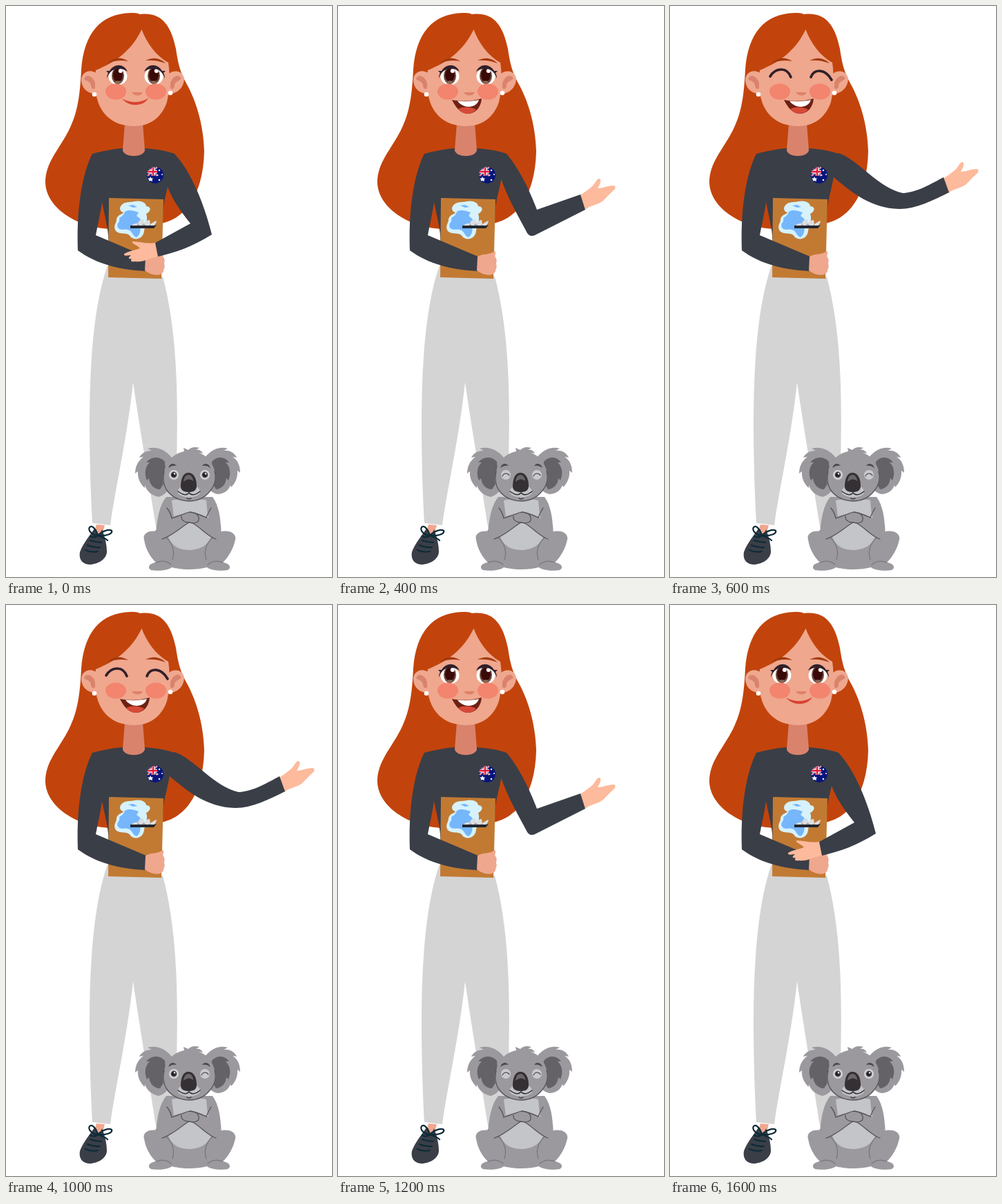
These frames come from a looping animation (472 px wide and 827 px high, 1800 ms). An HTML page:

```html
<!DOCTYPE html>
<html lang="en">
<head>
<meta charset="utf-8">
<title>Presenter and koala</title>
<style>
html, body { margin: 0; width: 100%; height: 100%; overflow: hidden; background: #fff; }
svg { display: block; width: 472px; height: 827px; }

.rest, .out, .side, .wide, .peak, .talk, .look, .beam, .awake, .doze, .wink {
  animation: 1800ms step-end infinite;
}
.rest  { animation-name: rest; }
.out   { animation-name: out; }
.side, .doze { animation-name: side; }
.wide  { animation-name: wide; }
.peak  { animation-name: peak; }
.talk  { animation-name: talk; }
.look  { animation-name: look; }
.beam, .wink { animation-name: beam; }
.awake { animation-name: awake; }

/* nine equal beats, mirrored around the fifth */
@keyframes rest  { 0%, 88.888% { opacity: 1 } 11.111% { opacity: 0 } 100% { opacity: 1 } }
@keyframes talk  { 0%, 88.888%, 100% { opacity: 0 } 11.111% { opacity: 1 } }
@keyframes out   { 0%, 22.222%, 88.888%, 100% { opacity: 0 } 11.111%, 77.777% { opacity: 1 } }
@keyframes side  { 0%, 33.333%, 77.777%, 100% { opacity: 0 } 22.222%, 66.666% { opacity: 1 } }
@keyframes wide  { 0%, 44.444%, 66.666%, 100% { opacity: 0 } 33.333%, 55.555% { opacity: 1 } }
@keyframes peak  { 0%, 55.555%, 100% { opacity: 0 } 44.444% { opacity: 1 } }
@keyframes look  { 0%, 66.666%, 100% { opacity: 1 } 33.333% { opacity: 0 } }
@keyframes beam  { 0%, 66.666%, 100% { opacity: 0 } 33.333% { opacity: 1 } }
@keyframes awake { 0%, 77.777%, 100% { opacity: 1 } 22.222% { opacity: 0 } }

.skin { fill: #efa78e; }
.shade { fill: #d9836d; }
.palm { fill: #fdba9c; }
.hair { fill: #c2440c; }
.knit { fill: #3a3e47; }
.fur { fill: #9b999e; }
.dark { fill: #646266; }
.pale { fill: #c3c5c9; }
.line { fill: none; stroke: #56545a; stroke-width: 1.3; stroke-linecap: round; stroke-linejoin: round; }
.lash { fill: none; stroke: #30202a; stroke-width: 3.6; stroke-linecap: round; }
</style>
</head>
<body>
<svg viewBox="0 0 472 827">
<defs>
  <path id="hand" class="palm" d="M351 274 C359 268 367 263 370 259 C373 255 375 250 379 250 C382 252 379 259 376 264 C383 264 391 260 399 260 C403 261 402 265 398 268 C393 272 389 277 384 282 C375 289 366 288 358 295Z"/>
  <path id="lid" fill="#30202a" d="M146 105 C146 101 147 99 148 97 L145 94 L150 94 C157 83 170 83 176 95 C166 88 151 89 146 105Z"/>
  <path id="armLine" class="line" d="M219 752 C229 748 238 740 250 737 C262 733 276 735 279 742 C280 748 272 750 264 748 C252 756 238 769 225 772"/>
  <g id="kEye">
    <circle r="7" fill="#d3d4d7"/>
    <circle r="4.400" fill="#454147"/>
    <circle cx="-.3" r="2.600" fill="#201d20"/>
    <circle cx="1" cy="-1.500" r="1.200" fill="#fff"/>
  </g>
  <g id="kShut">
    <circle r="7" fill="#c9cace"/>
    <path class="line" d="M-5 2 C-3 -3 3 -3 5 1"/>
  </g>
  <g id="eye">
    <ellipse rx="13.500" ry="12.500" fill="#fff"/>
    <ellipse cy="-1" rx="9" ry="12" fill="#6c4a3d"/>
    <ellipse cy="-2" rx="7" ry="10" fill="#3a0908"/>
    <ellipse cy="8" rx="4" ry="1.800" fill="#8d6a58"/>
    <circle cx="3.800" cy="-8" r="3" fill="#fff"/>
  </g>
  <clipPath id="disc"><circle cx="216" cy="245" r="12"/></clipPath>
</defs>

<!-- hair behind -->
<path class="hair" d="M181 10 C136 11 113 40 109 92 C107 130 104 154 91 180 C76 209 57 227 57 256 C58 291 101 321 152 323 L225 315 C267 306 286 262 287 210 C286 170 274 134 260 110 C253 97 249 84 246 62 C239 29 226 8 194 12 C190 10 186 10 181 10Z"/>

<!-- legs -->
<path fill="#d4d4d4" d="M147 376 C127 432 121 520 121 602 C121 662 123 712 125 749 L151 752 C158 700 176 622 184 545 C192 601 207 690 218 760 L242 756 C248 714 247 674 247.500 632 C249 540 245 460 227 392Z"/>
<path class="skin" d="M131 751 L143 752 L139 767 L127 764Z"/>
<path class="knit" d="M128 757 C122 766 111 779 107 791 C105 802 111 809 122 809 C134 808 146 801 146 790 C146 780 143 768 139 758 L135 768Z"/>
<g fill="none" stroke="#0b2b38" stroke-width="2.200" stroke-linecap="round">
  <path d="M133 767 C131 758 124 751 121 755 C118 760 126 767 133 767 C138 761 149 757 153 760 C155 765 143 768 133 767 C138 769 143 770 147 774 M133 767 C129 770 125 770 122 768"/>
  <path d="M122 774 Q130 777 138 777 M118 781 Q127 785 136 784 M115 788 Q124 792 133 790"/>
</g>

<!-- torso -->
<path class="knit" d="M170 206 C155 207 139 210 125 214 L139 284 C142 300 147 318 148 332 L150 380 L222 380 L228 291 C229 281 232 272 234 262 L244 214 C230 209 214 207 200 206Z"/>
<path class="shade" d="M172 170 L169 209 C171 220 199 220 201 209 L198 170Z"/>

<!-- badge -->
<g clip-path="url(#disc)">
  <path fill="#07157a" d="M203 232H229V258H203Z"/>
  <path stroke="#fff" stroke-width="2.200" d="M205 233 L219 246 M219 233 L205 246"/>
  <path stroke="#e2183a" stroke-width="1" d="M205 233 L219 246 M219 233 L205 246"/>
  <path stroke="#fff" stroke-width="4.400" d="M203 240H219 M213 232V246"/>
  <path stroke="#e2183a" stroke-width="2.400" d="M203 240H219 M213 232V246"/>
  <path fill="#fff" d="M209 247 L210.300 249.500 L213 249.500 L211.500 251.500 L212 254 L209 253 L206.500 254 L207 251.500 L205 249.500 L208 249.500Z"/>
  <g fill="#fff"><circle cx="222" cy="238" r="1.200"/><circle cx="226" cy="244" r="1"/><circle cx="219.500" cy="245" r="1"/><circle cx="222" cy="252" r="1.300"/></g>
</g>

<!-- board -->
<path fill="#c27a33" d="M149 278 L228 280 L225 395 L148 393Z"/>
<path fill="#d5f2fd" d="M166 290 C171 282 181 285 186 283 C195 281 203 285 203 290 C210 290 211 297 203 301 C206 309 202 318 200 325 C200 335 189 341 181 335 C176 326 168 333 159 326 C154 318 161 314 160 308 C163 301 169 302 170 299 C165 298 164 293 166 290Z"/>
<path fill="#76b6fb" d="M172 298 C178 294 186 297 192 299 L189 304 C193 307 197 309 196 316 C193 322 197 329 189 335 C183 333 183 326 177 324 C171 322 166 326 162 321 C159 314 166 314 164 307 C168 305 171 302 172 298Z M177 289 L184 288 L190 291 L184 292Z"/>
<path fill="#dcdedf" d="M181 319 C184 315 188 314 191 315 C192 311 195 309 199 309 C200 312 200 314 199 315 C202 312 205 310 208 310 L209 316 C212 314 214 312 218 311 C217 315 216 317 214 319Z"/>
<path fill="#a7abb0" d="M191 315 L195 319 L199 315 L205 319 L209 316 L210 319 L189 319Z"/>
<path fill="#23272f" d="M180 318 H214 L218 317 L214 322 H180Z"/>

<!-- holding arm -->
<path class="knit" d="M125 214 C108 248 102 302 104 354 C131 374 165 382 202 384 L203 363 L130 332 C133 315 137 300 139 284 L158 214Z"/>
<path class="skin" d="M202 363 C210 358 220 361 227 355 C230 357 226 361 228 364 C231 368 229 371 229 374 C231 378 228 381 228 384 C226 391 213 392 201 383Z"/>

<!-- head -->
<path class="skin" d="M132 98 C121 90 109 96 109 108 C110 121 120 128 132 127Z M235 99 C243 91 257 94 258 106 C257 120 246 128 235 127Z"/>
<path class="shade" d="M113 106 C116 97 127 102 129 112 L129 119 C126 122 123 119 123 114 C121 109 117 109 113 106Z M254 105 C250 97 241 102 238 112 L238 119 C242 122 244 119 244 114 C246 109 250 109 254 105Z"/>
<path class="skin" d="M196.500 34 C181 66 157 82 130 93 C127 117 130 137 139 151 C150 168 168 174 186 174 C211 174 227 158 233 139 C237 123 238 102 235 82 C217 72 204 54 196.500 34Z"/>
<circle cx="128" cy="128" r="3.300" fill="#fff"/>
<circle cx="238" cy="126" r="3.300" fill="#fff"/>
<path fill="#a3390b" d="M147 83 C155 74 167 73 177 80 C167 78 157 79 147 83Z M202 79 C211 74 222 74 231 83 C221 79 212 78 202 79Z"/>
<g class="look">
  <use href="#eye" x="162" y="102"/>
  <use href="#eye" x="214" y="102"/>
  <use href="#lid"/>
  <use href="#lid" transform="translate(376 0) scale(-1 1)"/>
</g>
<path class="lash beam" d="M145 102 C152 90 169 87 175 103 M204 103 C209 90 225 91 234 107"/>
<g fill="#f3846e">
  <ellipse cx="159" cy="124" rx="15" ry="11.500"/>
  <ellipse cx="217" cy="124" rx="15" ry="11.500"/>
</g>
<path fill="#df8067" d="M182 125 H198 C195 131 186 131 182 125Z"/>
<path class="rest" fill="#d7432f" d="M168 134 C179 141 196 141 206 133 C200 146 178 147 168 134Z"/>
<g class="talk">
  <path fill="#6e2113" d="M165 136 C181 139 195 138 208 134 C207 148 198 156 188 156 C177 156 170 146 165 136Z"/>
  <path fill="#fff" d="M173 137.500 C184 139 194 138 204 136 C200 149 181 149 173 137.500Z"/>
  <path fill="#d84a38" d="M174 149 C182 145 193 146 200 150 C194 158 181 158 174 149Z"/>
</g>

<!-- moving arm -->
<g class="rest">
  <path class="palm" d="M219 342 C206 346 195 341 183 341 C181 344 190 346 194 351 C186 354 177 355 171 359 C170 363 176 361 181 361 C177 364 176 367 182 366 C179 370 183 371 187 370 C200 372 210 363 222 363Z"/>
  <path class="knit" d="M244 214 C267 239 286 283 298 331 C271 348 246 357 220 363 L216 343 L267 315 C255 300 241 281 234 262 L225 230Z"/>
</g>
<g class="out">
  <use href="#hand" transform="translate(-27 36) rotate(30 355 284)"/>
  <path class="knit" d="M244 214 C263 236 280 273 291 303 L330 309 L328 332 L289 336 C283 337 280 334 277 330 C261 303 245 281 235 255 L225 230Z"/>
</g>
<g class="side">
  <use href="#hand"/>
  <path class="knit" d="M244 214 C262 235 278 268 288 295 L351 273 L358 295 L285 332 C280 334 277 333 274 329 C261 304 246 279 236 250 L225 230Z"/>
</g>
<g class="wide">
  <use href="#hand" x="45" y="-24"/>
  <path class="knit" d="M244 213 C272 222 302 264 337 271 C358 270 379 257 396 248 L404 270 C380 282 356 294 332 294 C291 293 263 270 237 248 L225 230Z"/>
</g>
<g class="peak">
  <use href="#hand" x="49.500" y="-30"/>
  <path class="knit" d="M244 213 C272 221 304 260 338 267 C361 266 383 252 400 243 L408 265 C384 277 359 290 334 290 C293 290 264 268 237 248 L225 230Z"/>
</g>

<!-- koala body -->
<path class="knit" d="M216 760 L222 757 L222 764Z"/>
<path class="fur" d="M222 762 C209 758 197 763 200 773 C202 786 208 797 217 806 C207 807 204 814 210 817 C221 819 236 817 240 813 C255 817 276 817 291 813 C295 817 311 819 321 817 C327 814 324 807 314 806 C323 797 329 786 332 773 C334 763 322 758 309 762Z"/>
<path class="fur" d="M232 711 C221 724 218 748 217 768 C224 774 238 771 246 764 L286 764 C294 771 306 774 311 768 C312 748 309 724 299 711Z"/>
<path class="pale" d="M240 716 C252 713 279 713 290 716 L292 738 L300 756 C299 777 284 788 265 788 C246 788 234 777 233 758 L243 740Z"/>
<path class="fur" d="M311 752 C302 748 292 739 280 736 C267 732 256 734 254 740 C256 747 262 749 268 748 C279 754 292 769 305 772 C312 771 312 760 311 752Z"/>
<path class="line" d="M290 741 C283 738 275 734 266 733 M268 748 C280 753 291 768 304 772"/>
<path class="fur" d="M219 752 C229 748 238 740 250 737 C262 733 276 735 279 742 C280 748 272 750 264 748 C252 756 238 769 225 772 C217 771 217 760 219 752Z"/>
<path class="line" d="M233 727 C237 732 239 737 240 742 M297 727 C294 732 291 737 290 741 M240 742 C248 739 255 737 262 734 C271 731 279 736 279 742 C280 748 273 750 265 748 C253 755 240 768 226 772 M254 739 C253 744 258 748 264 748"/>
<path class="line" stroke-opacity=".5" d="M232 770 C241 778 245 790 241 802 M299 770 C290 778 286 790 290 802 M217 806 C225 803 233 804 239 809 M314 806 C306 803 298 804 292 809"/>

<!-- koala head -->
<path class="fur" d="M240 654 C231 643 218 637 205 641 L211 644 C202 644 196 648 193 654 L199 653 C191 659 187 667 187 677 L191 674 C190 684 195 693 201 698 L201 694 C204 703 211 709 221 711 C231 708 237 700 239 691Z"/>
<path class="fur" d="M288 654 C297 642 310 637 321 641 L315 644 C325 643 331 648 334 654 L328 653 C336 658 339 666 339 676 L335 673 C336 684 331 692 326 697 L325 694 C322 702 315 707 306 707 C297 705 292 699 290 691Z"/>
<path class="dark" d="M230 660 C222 651 210 653 203 661 L208 661 C201 668 200 677 204 687 L207 684 C208 693 214 700 223 700 L232 686Z M298 660 C306 651 317 653 323 661 L318 661 C325 668 326 677 322 687 L319 684 C318 693 313 699 304 700 L296 686Z"/>
<path class="fur" d="M258 645 L257 640 L264 643 C268 639 273 638 280 640 L275 643 C280 642 283 644 285 648 L279 647 C291 651 299 661 302 673 C306 684 303 695 295 703 C286 713 276 717 265 717 C253 717 242 713 234 704 C227 696 225 686 229 674 C232 660 242 648 258 645Z"/>
<path class="line" d="M229 674 C226 687 229 697 235 704 C244 714 254 717 265 717 C276 717 287 713 295 703 C302 695 305 685 302 674"/>
<path fill="#4b484c" d="M235 669 C237 662 243 661 247 666 C242 665 239 666 235 669Z M284 666 C287 661 294 662 296 669 C292 666 289 665 284 666Z"/>
<path class="pale" d="M254 696 C249 699 247 704 250 707 C258 713 272 713 280 707 C283 704 280 699 276 696Z"/>
<path fill="#343033" d="M253 696 C253 682 258 676 264 676 C271 676 276 683 276 695 C276 702 271 704 264.500 704 C258 704 253 702 253 696Z"/>
<path fill="#6a666a" d="M257 689 C258 681 261 679 265 679 C269 680 271 684 271 688 C266 684 262 685 257 689Z"/>
<path d="M249 703 C257 709 262 709 265 705 C268 709 274 709 281 703 M262 713 Q265 715 268 713" fill="none" stroke="#343033" stroke-width="1.500" stroke-linecap="round"/>
<g class="awake"><use href="#kEye" x="243" y="679"/><use href="#kEye" x="288" y="679"/></g>
<g class="doze"><use href="#kShut" x="243" y="679"/><use href="#kShut" x="288" y="679"/></g>
<g class="wink"><use href="#kEye" x="243" y="679"/><use href="#kShut" x="288" y="679"/></g>
</svg>
</body>
</html>
```
